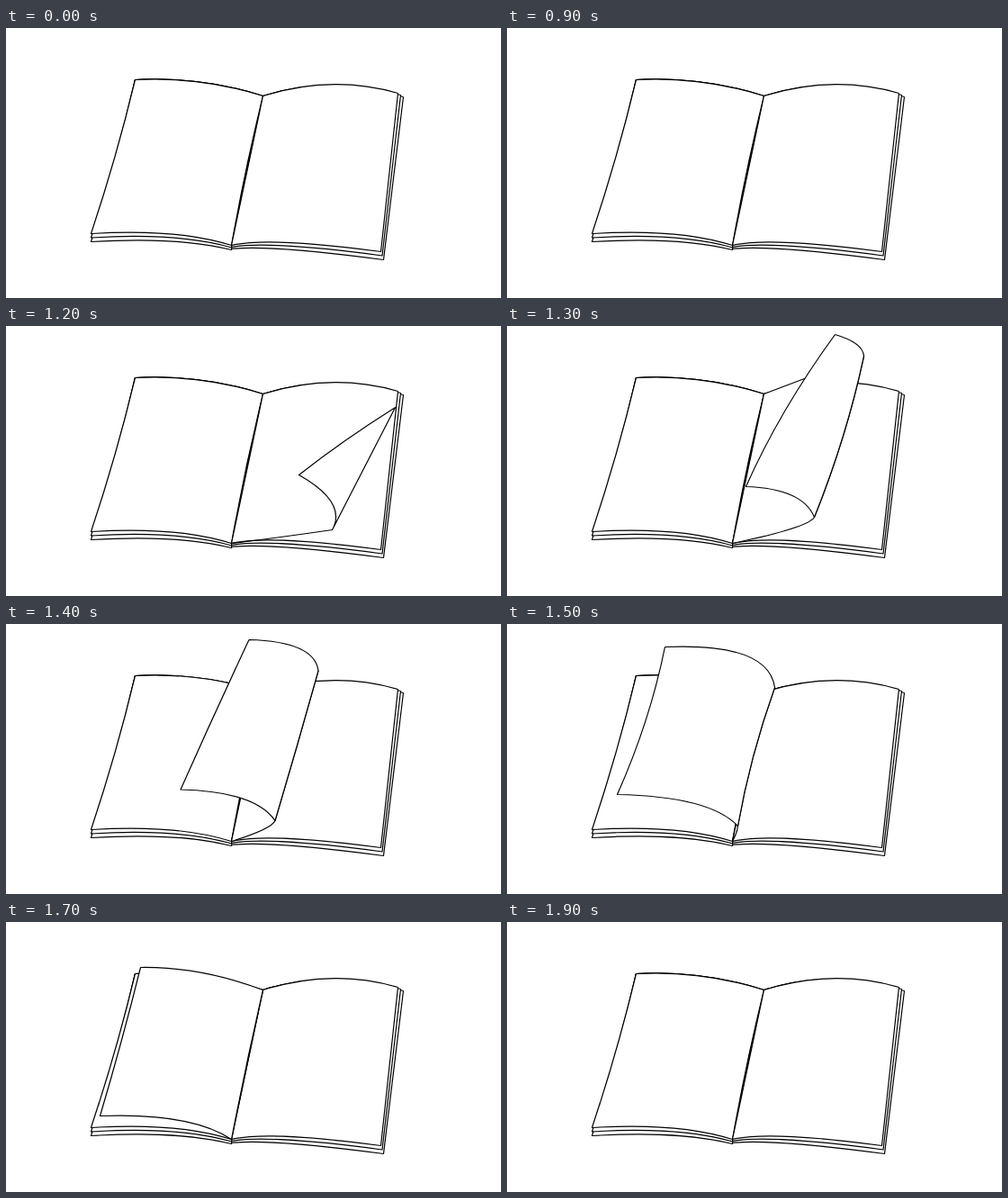
An HTML page for the animation above (9 s loop, 550 by 300 pixels).

```html
<!DOCTYPE html>
<html lang="en">
<head>
<meta charset="utf-8">
<title>Turning page</title>
<style>
html, body { margin: 0; width: 100%; height: 100%; overflow: hidden; background: #fff; }
svg { display: block; }
path { fill: #fff; stroke: #000; stroke-width: 1.2; stroke-linejoin: round; }
#curl { fill: none; }
</style>
</head>
<body>
<svg width="550" height="300" viewBox="0 0 550 300">
  <g transform="translate(.5 .5)">
    <g id="book"></g>
    <path id="back"/><path id="front"/><path id="curl"/>
  </g>
</svg>
<script>
const head = [285, 75], foot = [250, 241];   // ends of the spine

const mix = (a, b, k = .5) =>
  Array.isArray(a) ? a.map((v, i) => mix(v, b[i], k)) : a + (b - a) * k;

// Nearly straight edge from a to b, pushed sideways in the middle
const edge = (a, b, bow) => {
  const [x, y] = mix(a, b);
  return `Q${x + 2 * bow} ${y} ${b}`;
};

// A leaf bends along the line from `bend` to `roll`; its free corners are `top` and `bottom`
function leaf([top, topPull, bend, roll, lipPull, bottom, bow]) {
  const side = edge(bend, roll, -.7 * bow);
  const under = [mix(foot[0], roll[0], .92), mix(foot[1], roll[1], .6)];
  return {
    back: `M${head}L${bend}${side}Q${under} ${foot}Z`,
    front: `M${top}Q${topPull} ${bend}${side}Q${lipPull} ${bottom}${edge(bottom, top, bow)}`
  };
}

// A lifted corner, folded from `hinge` on the outer edge to `roll` at the bottom
const corner = ([hinge, roll, tip]) => ({
  curl: `M${foot}Q300 235 ${roll}Q${roll[0] + 17} ${mix(roll[1], tip[1])} ${tip}` +
        `${edge(tip, hinge, -3)}L${roll}`
});

const upright = [[364, 9], [395, 18], [396, 33], [341, 212], [328, 180], [265, 178], -6];
const falling = [[175, 25], [290, 20], [297, 70], [256, 224], [225, 191], [122, 189], 5];
const landing = [[149, 50], [215, 49], head, foot, [205, 211], [104, 215], 1];
const flat = [[143, 57], [215, 53], head, foot, [190, 222], [94, 228], 2];

const closed = Array(3).fill([416, 248]);
const lifted = [[419, 194], [379, 232], [383, 186]];
const folded = [[432, 90], [362, 226], [325, 165]];

const still = {};
const poses = [
  still,
  ...[mix(closed, lifted), lifted, folded].map(corner),
  ...[upright, mix(upright, falling), falling,
      mix(falling, landing), landing, mix(landing, flat)].map(leaf)
];

// Stacked leaves, lowest first
const leftLeaf = i =>
  [[143, 57], [215, 53], head, [250, 241 + 2.5 * i], [190, 222 + 4.5 * i], [94, 228 + 4.5 * i], 2];
const rightLeaf = i =>
  [[435 + 3 * i, 72 + 2 * i], [362, 51], head, [250, 241 + 2 * i],
   [290, 231 + 4.5 * i], [416 + 1.5 * i, 248 + 4.5 * i], 0];

const part = id => document.getElementById(id);
part('book').innerHTML = [2, 1, 0]
  .flatMap(i => [leftLeaf(i), rightLeaf(i)])
  .map(page => `<path d="${leaf(page).front}"/>`).join('');

let shown;
function draw() {
  const step = Math.floor((performance.now() % 9000 - 900) / 100);
  const pose = poses[step] || still;
  if (pose !== shown) {
    for (const id of ['back', 'front', 'curl']) part(id).setAttribute('d', pose[id] || '');
    shown = pose;
  }
  requestAnimationFrame(draw);
}
draw();
</script>
</body>
</html>
```
